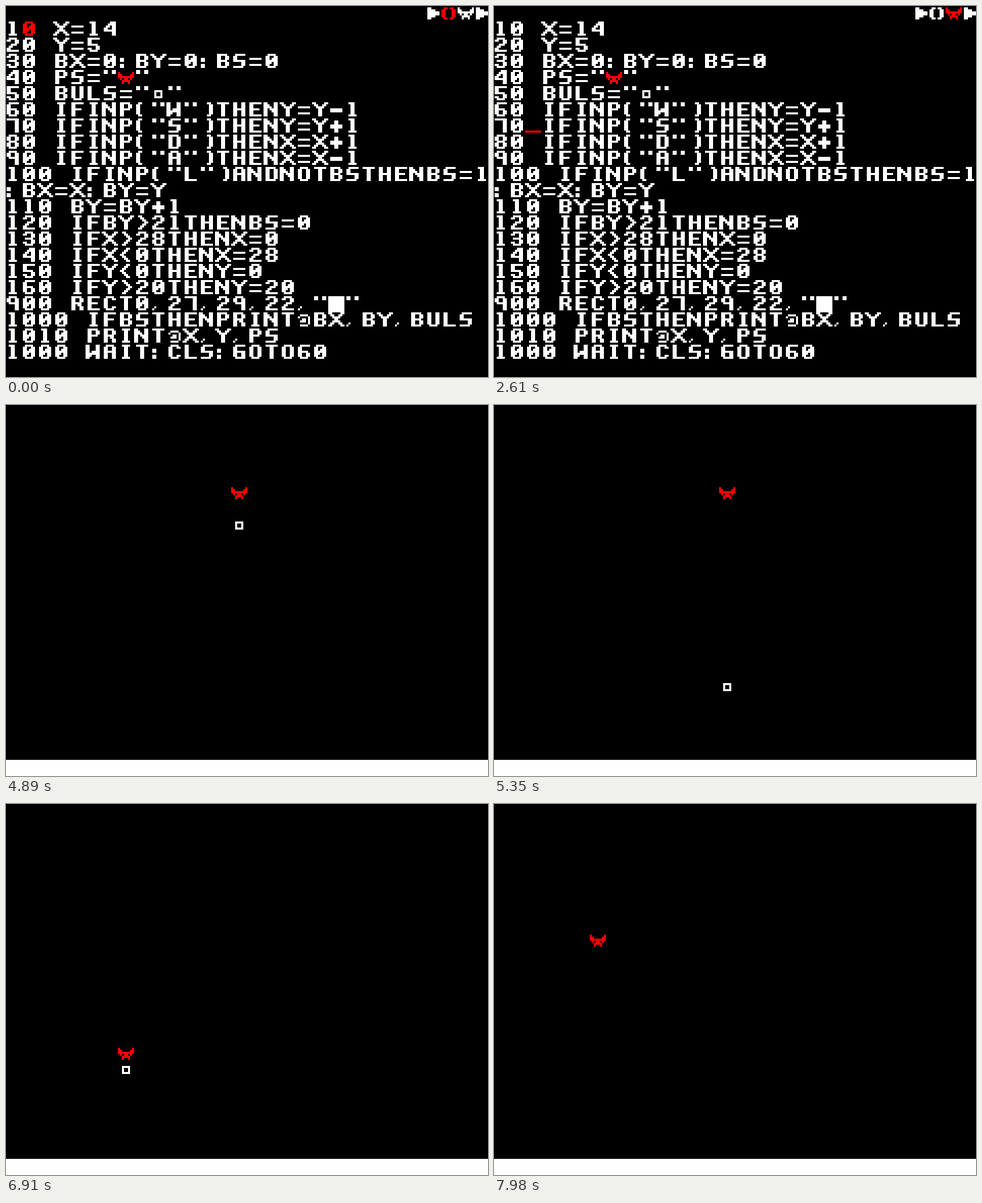
An HTML page with a canvas that plays this animation: 715 by 551 pixels, repeating every 8 s.

```html
<!DOCTYPE html>
<html lang="en">
<head>
<meta charset="utf-8">
<title>Pixel BASIC</title>
<style>
  html, body { margin: 0; width: 100%; height: 100%; overflow: hidden; background: #000; }
  canvas { display: block; }
  pre {
    position: absolute; left: -2px; top: 23px; margin: 0;
    font: 24px/24px "DejaVu Sans Mono", monospace; color: transparent;
  }
</style>
</head>
<body>
<canvas id="screen" width="715" height="551"></canvas>
<pre id="text"></pre>
<script>
const LOOP = 8000, CELL = 24, DOT = 3, SPEED = 0.06;
const WHITE = '#fff', RED = '#f00';
const ctx = document.getElementById('screen').getContext('2d');
const pre = document.getElementById('text');

// A stroke is a list of [x, y] points on an 8x8 cell; "/" parts strokes.
const parse = s => s.split('/').map(line => line.split(' ').map(p => [+p[0], +p[1]]));
const flip = (strokes, w) => strokes.map(line => line.map(([x, y]) => [w - x, y]));
const turn = strokes => strokes.map(line => line.map(([x, y]) => [x, 6 - y]));

function glyph(strokes, pen) {
  const dots = new Set(), path = new Path2D();
  const mark = (x, y) => {
    for (let i = 0; i < pen; i++) dots.add((x + i) + ',' + y);
  };
  for (const line of strokes) {
    let [x, y] = line[0];
    mark(x, y);
    for (const [nx, ny] of line.slice(1)) {
      const n = Math.max(Math.abs(nx - x), Math.abs(ny - y));
      for (let i = 1; i <= n; i++)
        mark(Math.round(x + (nx - x) * i / n), Math.round(y + (ny - y) * i / n));
      [x, y] = [nx, ny];
    }
  }
  for (const d of dots) {
    const [x, y] = d.split(',');
    path.rect(x * DOT, y * DOT, DOT, DOT);
  }
  return { path, dots };
}

// Segments of the typeface. Each key names the part itself, then its
// left-right, up-down and diagonal reflections.
const segments = {
  qezc: '10', rufj: '11 12', tygh: '11', poln: '11 33', KEZC: '00',
  ad: '13', 'w-x-': '20 40', 'N-M-': '20', 'A-B-': '40 13',
  s: '23 43', k: '33 43', i: '30 36', I: '31 33', v: '33 36', X: '36',
  F: '14 54', G: '12 52', H: '15 55', L: '00 06', V: '14 36 54',
  D: '12 13', S: '15 16'
};
const part = {};
for (const names in segments) {
  const s = parse(segments[names]);
  [s, flip(s, 6), turn(s), turn(flip(s, 6))].forEach((p, i) => { part[names[i]] = p; });
}

const letters = {
  A: 'wraszfudjc', B: 'qwrasfzxuj', C: 'wrafxyh', D: 'qwrafzxudj', E: 'qwerasfzxc',
  F: 'qwerasfz', G: 'werafxcjdk', H: 'qrafzseudjc', I: 'wix', J: 'weudjxg',
  K: 'qrafzeonc', L: 'qrafzxc', M: 'LKpoeudjc', N: 'LKpneudjc', O: 'wrafxudj',
  P: 'qwrafzsu', Q: 'wrafxudjnc', R: 'qwrafzsunc', S: 'werasdjxz', T: 'qwei',
  U: 'qrafxeudj', V: 'qraeudV', W: 'Llneudjc', X: 'KEZCpoln', Y: 'KEpov', Z: 'qweolzxc',
  0: 'wrafxudjol', 1: 'Nix', 2: 'twuklzxc', 3: 'twusjxg', 4: 'eudjcAF',
  5: 'qwerasjxg', 6: 'werafxjs', 7: 'qweudjc', 8: 'wrusfjx', 9: 'wrusdjc',
  '=': 'GH', '-': 'asdF', '+': 'asdFIv', ':': 'DS', ';': 'DS', '.': 'S',
  '"': 'qtey', "'": 'I', '(': 'NrafM', '<': 'AB', '[': 'qNrafzM', '/': 'EolZ',
  '_': 'ZzxcC', '!': 'IX', '$': 'werasdjxzi', '&': 'wrsfxnc', '{': 'ia', '|': 'i',
  '?': 'twukX', '#': 'GHrafudj', '%': 'EolZth', '*': 'polnI'
};
const mirrored = { ')': '(', '>': '<', ']': '[', '\\': '/', '}': '{' };
const solid = { '▶': '11 16/32 35/53 54', c: '11 02 05 16/41 52 55 46', f: '03/14 54/15 65/26/56' };
const thin = {
  ',': '25 16', '`': '10 21', '^': '22 31 42', '~': '23 32 43 52',
  '@': '12 21 51 62 65 56 26/24 33 43 44 34', '▫': '22 52 55 25 22',
  g: '02 22 13/23 64/15 65/56/63'
};
// Left halves of the symmetric sprites
const halves = {
  v: '01 03/12 14/13 33 34/25 35/26',
  a: '30 20 22 32/33 34/13 33/34 16',
  d: '33 13 11/13 16 36/34'
};

const glyphs = {};
const build = s => [...s].flatMap(n => part[n]);
for (const ch in letters) glyphs[ch] = glyph(build(letters[ch]), 2);
for (const ch in mirrored) glyphs[ch] = glyph(flip(build(letters[mirrored[ch]]), 6), 2);
for (const ch in solid) glyphs[ch] = glyph(parse(solid[ch]), 2);
for (const ch in thin) glyphs[ch] = glyph(parse(thin[ch]), 1);
for (const ch in halves) {
  const half = parse(halves[ch]);
  glyphs[ch] = glyph([...half, ...flip(half, 7)], 1);
}
glyphs['█'] = { path: new Path2D() };
glyphs['█'].path.rect(0, 0, CELL, CELL);

function print(col, row, str, color = WHITE) {
  ctx.fillStyle = color;
  [...str].forEach((ch, i) => {
    if (!glyphs[ch]) return;
    ctx.setTransform(1, 0, 0, 1, (col + i) * CELL - 2, row * CELL - 1);
    ctx.fill(glyphs[ch].path);
  });
  ctx.resetTransform();
}

const listing = [
  '10 X=14',
  '20 Y=5',
  '30 BX=0:BY=0:BS=0',
  '40 PS=" "',
  '50 BULS="▫"',
  '60 IFINP("W")THENY=Y-1',
  '70 IFINP("S")THENY=Y+1',
  '80 IFINP("D")THENX=X+1',
  '90 IFINP("A")THENX=X-1',
  '100 IFINP("L")ANDNOTBSTHENBS=1',
  ':BX=X:BY=Y',
  '110 BY=BY+1',
  '120 IFBY>21THENBS=0',
  '130 IFX>28THENX=0',
  '140 IFX<0THENX=28',
  '150 IFY<0THENY=0',
  '160 IFY>20THENY=20',
  '900 RECT0,27,29,22,"█"',
  '1000 IFBSTHENPRINT@BX,BY,BULS',
  '1010 PRINT@X,Y,PS',
  '1000 WAIT:CLS:GOTO60'
];
const keys = ['`1234567890-=', 'QWERTYUIOP[]\\', "ASDFGHJKL;'", 'ZXCVBNM,./'];
const shifted = ['~!@#$%^&*()_+', '▫▫▶▫▫▫▫▫▫█{}|', 'a▫dfg▫▫▫▫:"', '▫▫c▫v▫▫<>?'];
pre.textContent = listing.join('\n');

function tabs(active) {
  [...'▶cv▶'].forEach((ch, i) => print(26 + i, 0, ch, i === active ? RED : WHITE));
}

const cursorMoves = [1310, 1510, 1640, 1820, 1970, 2100];

function drawListing(t) {
  const row = 1 + cursorMoves.filter(s => s <= t).length;
  const tabbed = t >= 2610;
  const col = tabbed ? 2 : 1;
  const under = Math.floor((t + 400) / 510) % 2 === 1;
  tabs(col);
  listing.forEach((line, i) => {
    const hole = i + 1 === row ? line.slice(0, col) + ' ' + line.slice(col + 1) : line;
    print(0, i + 1, hole);
  });
  print(7, 4, 'v', RED);
  print(col, row, under ? '_' : listing[row - 1][col], RED);
}

function drawEditor(t) {
  tabs(t < 3760 ? 2 : 3);
  for (let y = 0; y < 8; y++)
    for (let x = 0; x < 8; x++)
      print(12 + x, 5 + y, glyphs.A.dots.has(x + ',' + y) ? '█' : '▫', x === 4 && y === 4 ? RED : WHITE);
  keys.forEach((line, i) => print(1, 18 + i, line));
  shifted.forEach((line, i) => print(16, 18 + i, line));
  print(1, 20, 'A', RED);
}

// Held direction keys: key, time pressed, cells travelled
const steer = { W: [0, -1], A: [-1, 0], S: [0, 1], D: [1, 0] };
const holds = [
  ['S', 5447, 10], ['A', 5592, 12], ['D', 6400, 5], ['D', 6953, 15],
  ['W', 7203, 15], ['A', 7453, 22], ['S', 7820, 8], ['D', 7860, 6]
];
// Bursts of fire: time, column, row, number of shots
const bursts = [[4870, 14, 5, 2], [6040, 2, 15, 3], [6674, 7, 15, 3]];

function drawGame(t) {
  ctx.fillStyle = WHITE;
  ctx.fillRect(0, 527, 715, 24);
  for (const [start, col, row, count] of bursts) {
    const life = 22 - row;
    const step = Math.floor((t - start) * SPEED);
    const y = row + 1 + step % life;
    if (step >= 0 && step < life * count && y <= 21) print(col, y, '▫');
  }
  let x = 14, y = 5;
  for (const [key, start, cells] of holds) {
    const n = Math.min(cells, Math.max(0, Math.floor((t - start) * SPEED)));
    x += steer[key][0] * n;
    y += steer[key][1] * n;
  }
  print(x, y, 'v', RED);
}

function draw(t) {
  ctx.fillStyle = '#000';
  ctx.fillRect(0, 0, 715, 551);
  pre.hidden = t >= 2660;
  if (t < 2660) drawListing(t);
  else if (t < 3910) drawEditor(t);
  else drawGame(t);
}

const begin = performance.now();
function frame() {
  draw((performance.now() - begin) % LOOP);
  requestAnimationFrame(frame);
}
frame();
</script>
</body>
</html>
```
